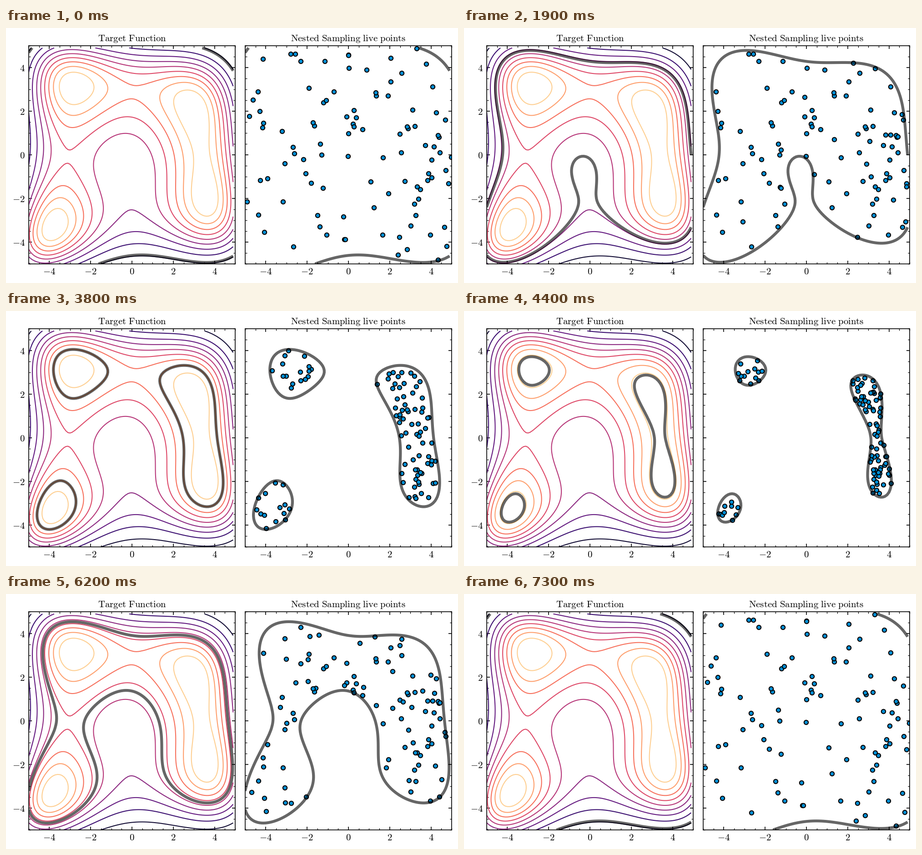
Recreate the animation shown at these times as a matplotlib script. Size 994 by 561 pixels, loop 7600 ms.

```python
import numpy as np
import matplotlib.pyplot as plt
from matplotlib.animation import FuncAnimation
from matplotlib.ticker import AutoMinorLocator, MultipleLocator

W, H, DPI = 994, 561, 150
TICK_MS = 50
N_LIVE = 100
N_STATES = 28

plt.rcParams.update({
    "mathtext.fontset": "cm",
    "font.size": 10,
    "axes.linewidth": 0.8,
})


def likelihood(x, y):
    return np.exp(-((x**2 + y - 11)**2 + (x + y**2 - 7)**2) / 200)


def draw_points(rng, n, level):
    """Uniform points whose likelihood exceeds the level."""
    pts = rng.uniform(-5, 5, (20000, 2))
    return pts[likelihood(*pts.T) >= level][:n]


def nested_sampling(levels, seed=4):
    """Live points at each threshold; points that fall below are redrawn."""
    rng = np.random.default_rng(seed)
    live = draw_points(rng, N_LIVE, levels[0])
    for level in levels:
        dead = likelihood(*live.T) < level
        live[dead] = draw_points(rng, dead.sum(), level)
        yield live.copy()


def climb_ms(s):
    """How long a state stays on the way up."""
    if s == N_STATES - 1:
        return 1500
    if s >= 24:
        return 300
    return 200 if s >= 15 or s in (2, 4) else 100


def rewind_ms(s):
    """How long a state stays on the way back."""
    if s == 0:
        return 300
    return 100 if s in (2, 4) else 50


def timeline():
    """State shown in each tick: slow climb, hold, quick rewind."""
    up = [(s, climb_ms(s)) for s in range(N_STATES)]
    down = [(s, rewind_ms(s)) for s in reversed(range(N_STATES - 1))]
    return [s for s, ms in up + down for _ in range(ms // TICK_MS)]


def make_axes(left, title, labels):
    ax = fig.add_axes([left / W, 1 - 519 / H, 454 / W, 480 / H])
    for axis in (ax.xaxis, ax.yaxis):
        axis.set_major_locator(MultipleLocator(2))
        axis.set_minor_locator(AutoMinorLocator(4))
        axis.set_major_formatter(lambda v, pos: f"${v:.0f}$")
    ax.tick_params(which="both", direction="in", top=True, right=True,
                   labelleft=labels)
    ax.tick_params(which="major", length=3.5, width=0.8)
    ax.tick_params(which="minor", length=2, width=0.6)
    ax.tick_params(axis="x", pad=3.4)
    ax.tick_params(axis="y", pad=4)
    ax.set_title(r"$\mathrm{%s}$" % title.replace(" ", r"\ "),
                 fontsize=10, pad=5)
    return ax


def threshold(ax, level):
    return ax.contour(X, Y, Z, levels=[level], colors="black", alpha=0.6,
                      linewidths=3)


fig = plt.figure(figsize=(W / DPI, H / DPI), dpi=DPI, facecolor="white")
ax_map = make_axes(50, "Target Function", True)
ax_live = make_axes(526, "Nested Sampling live points", False)

grid = np.arange(100) / 10 - 5
X, Y = np.meshgrid(grid, grid)
Z = likelihood(X, Y)
ax_map.contour(X, Y, Z, levels=np.arange(1, 10) / 10, cmap="magma",
               vmin=0, vmax=1, linewidths=1)

# The threshold rises faster as the live volume shrinks
levels = np.interp(np.arange(N_STATES), [0, 8, 14, 20, 25, 27],
                   [0.107, 0.241, 0.354, 0.551, 0.80, 0.92])

states = []
for level, pts in zip(levels, nested_sampling(levels)):
    dots = ax_live.scatter(*pts.T, s=20, c="#008fd5", edgecolors="black",
                           linewidths=1)
    states.append([threshold(ax_map, level), dots, threshold(ax_live, level)])

for ax in (ax_map, ax_live):
    ax.set(xlim=(-5, 5), ylim=(-5, 5))

order = timeline()


def update(frame):
    for i, artists in enumerate(states):
        for artist in artists:
            artist.set_visible(i == order[frame])
    return states[order[frame]]


anim = FuncAnimation(fig, update, frames=len(order), interval=TICK_MS,
                     repeat=True, repeat_delay=0, blit=False)
plt.show()
```
